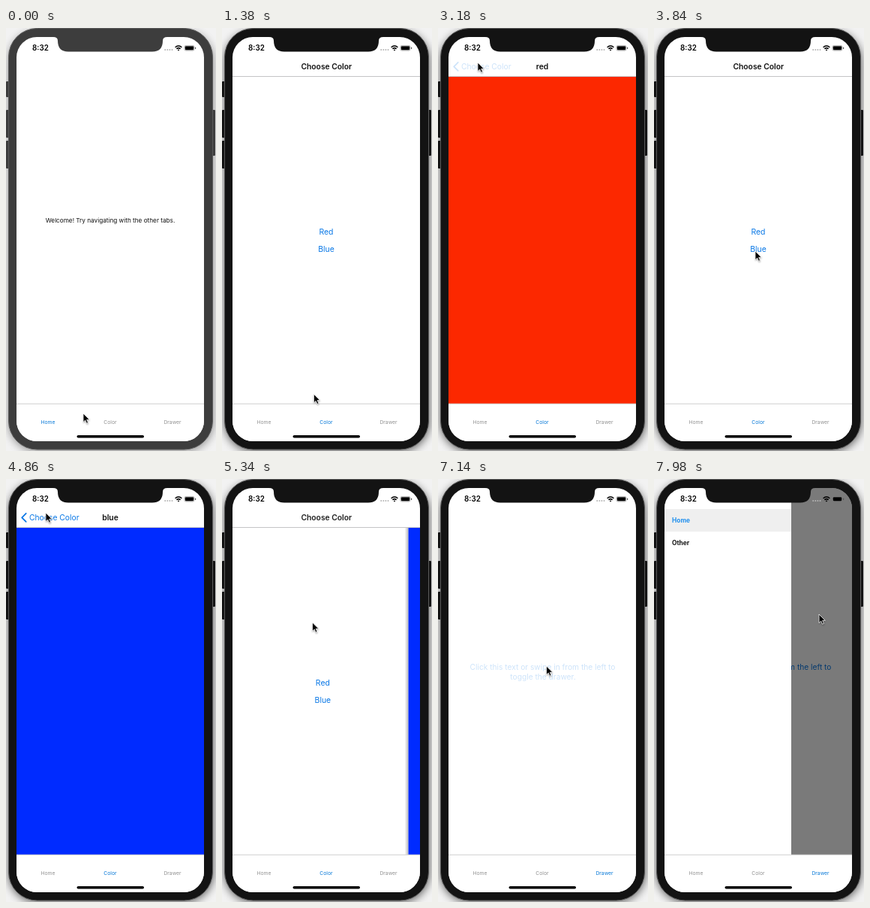
Recreate the animation shown at these times as an HTML page. Size 280 by 563 pixels, loop 8000 ms.

```html
<!DOCTYPE html>
<html lang="en">
<head>
<meta charset="utf-8">
<title>Tab, stack and drawer navigation</title>
<style>
  html, body { margin: 0; width: 100%; height: 100%; overflow: hidden; background: #f2f2f2; }
  svg { display: block; width: 280px; height: 563px; font-family: Inter, Roboto, sans-serif; }
  .mid { text-anchor: middle; }
  .title { font-size: 10.3px; font-weight: 600; fill: #111; }
  .back { font-size: 10.3px; }
  .link { font-size: 10.4px; fill: #0a78e6; }
  .tab { font-size: 6.8px; fill: #929292; text-anchor: middle; }
  .tab.on { fill: #0a7ad8; }
  .item { font-size: 8.4px; font-weight: 700; fill: #151515; }
</style>
</head>
<body>
<svg viewBox="0 0 280 563">
  <defs>
    <clipPath id="glass"><rect x="14" y="12" width="250" height="538" rx="27"/></clipPath>
    <clipPath id="view"><rect x="14" y="12" width="250" height="488"/></clipPath>
    <clipPath id="body"><rect x="14" y="65" width="250" height="435"/></clipPath>
    <linearGradient id="edge">
      <stop offset="0" stop-color="#000" stop-opacity="0"/>
      <stop offset="1" stop-color="#000" stop-opacity=".28"/>
    </linearGradient>
    <filter id="blur" x="-20%" y="-20%" width="140%" height="140%"><feGaussianBlur stdDeviation="6"/></filter>
    <filter id="soft" x="-60%" y="-60%" width="220%" height="220%"><feGaussianBlur stdDeviation=".9"/></filter>
  </defs>

  <rect width="280" height="563" fill="#f2f2f2"/>
  <rect id="shade" x="3" y="4" width="274" height="560" rx="40" filter="url(#blur)"/>
  <g id="bezel">
    <rect x="0" y="71" width="4" height="21" rx="1"/>
    <rect x="0" y="109" width="4" height="37" rx="1"/>
    <rect x="0" y="150" width="4" height="37" rx="1"/>
    <rect x="275" y="109" width="4" height="61" rx="1"/>
    <rect x="3.5" y=".5" width="272" height="560.5" rx="38" stroke="#5a5a5a"/>
  </g>

  <g clip-path="url(#glass)">
    <rect x="14" y="12" width="250" height="538" fill="#fff"/>

    <g id="homeTab">
      <text class="mid" x="139" y="259" font-size="8.2" fill="#111">Welcome! Try navigating with the other tabs.</text>
    </g>

    <g id="colorTab">
      <g clip-path="url(#body)">
        <g id="list">
          <text id="red" class="link mid" x="139" y="275">Red</text>
          <text id="blue" class="link mid" x="139" y="297.5">Blue</text>
        </g>
        <g id="card">
          <rect x="9" y="65" width="5" height="435" fill="url(#edge)"/>
          <rect id="fill" x="14" y="65" width="250" height="435"/>
        </g>
      </g>
      <rect x="14" y="64" width="250" height="1" fill="#c4c4c6"/>
      <text id="listTitle" class="title mid" x="139.3" y="54.7">Choose Color</text>
      <text id="cardTitle" class="title mid" x="139" y="54.7"></text>
      <g id="back">
        <path d="M26.7 45.8 L21.2 51.3 L26.7 56.8" fill="none" stroke="#0a78e6" stroke-width="1.8" stroke-linecap="round" stroke-linejoin="round"/>
        <text class="back" x="31" y="54.7" fill="#0a78e6">Choose Color</text>
      </g>
    </g>

    <g id="drawerTab" clip-path="url(#view)">
      <g id="hint" class="mid" font-size="10.2" fill="#0a78e6">
        <text x="139.5" y="253.7">Click this text or swipe in from the left to</text>
        <text x="140" y="266.5">toggle the drawer.</text>
      </g>
      <rect id="dim" x="14" y="12" width="250" height="488" fill="#000"/>
      <g id="drawer">
        <rect x="14" y="12" width="169" height="488" fill="#fff"/>
        <rect x="14" y="40" width="169" height="30" fill="#efefef"/>
        <text class="item" x="24" y="58.2" style="fill:#2190ee">Home</text>
        <text class="item" x="24" y="88">Other</text>
      </g>
    </g>

    <rect x="14" y="500" width="250" height="50" fill="#fff"/>
    <rect x="14" y="499.7" width="250" height="1" fill="#cfcfcf"/>
    <text class="tab" x="56" y="526.5">Home</text>
    <text class="tab" x="139" y="526.5">Color</text>
    <text class="tab" x="222" y="526.5">Drawer</text>
    <rect x="94.5" y="542" width="89.5" height="3.6" rx="1.8" fill="#000"/>

    <text x="35" y="30.3" font-size="9.8" font-weight="600" fill="#000">8:32</text>
    <g fill="#b5b5b5">
      <circle cx="212.2" cy="29" r="1"/><circle cx="215.3" cy="29" r="1"/>
      <circle cx="218.4" cy="29" r="1"/><circle cx="221.5" cy="29" r="1"/>
    </g>
    <g fill="none" stroke="#000" stroke-width="1.5">
      <path d="M225.6 25.8 Q230 21.8 234.4 25.8"/>
      <path d="M227.4 27.8 Q230 25.4 232.6 27.8"/>
    </g>
    <path d="M228.6 29.1 Q230 28 231.4 29.1 L230 30.6 Z"/>
    <rect x="238" y="23.4" width="13" height="6.6" rx="1.8" fill="none" stroke="#777" stroke-width=".6"/>
    <rect x="238.8" y="24.2" width="11.4" height="5" rx="1.1"/>
    <rect x="252" y="25.5" width="1.2" height="2.4" rx=".6" fill="#555"/>
  </g>

  <path id="notch" d="M63 11 H215 V12 Q209 12 209 17 Q209 31.5 195 31.5 H83 Q69 31.5 69 17 Q69 12 63 12 Z"/>

  <g id="cursor">
    <path d="M0 1 V13 L3 10.4 L5 15 L7 14 L5 9.6 H9 Z" opacity=".4" filter="url(#soft)"/>
    <path d="M0 0 V11.6 L2.7 9.1 L4.5 13.2 L6.5 12.3 L4.7 8.3 H8.3 Z" fill="#000" stroke="#fff" stroke-width=".8"/>
  </g>
</svg>
<script>
const LOOP = 8000, STEP = 60;
const $ = id => document.getElementById(id);
const tabs = [...document.querySelectorAll('.tab')];
const screens = ['homeTab', 'colorTab', 'drawerTab'].map($);
const clamp = v => Math.max(0, Math.min(1, v));
const mix = (a, b, k) => a + (b - a) * k;
const ramp = (t, start, span) => clamp((t - start) / span);
const smooth = k => k * k * (3 - 2 * k);

function bezier(x1, y1, x2, y2) {
  const at = (a, b, s) => 3 * (1 - s) ** 2 * s * a + 3 * (1 - s) * s * s * b + s ** 3;
  return x => {
    let lo = 0, hi = 1;
    for (let i = 0; i < 24; i++) {
      const s = (lo + hi) / 2;
      if (at(x1, x2, s) < x) lo = s; else hi = s;
    }
    return x >= 1 ? 1 : at(y1, y2, lo);
  };
}
const slide = bezier(.2833, .99, .31833, .99);

// time, x, y
const pointer = [
  [60, 103, 513], [720, 119, 521], [1260, 119, 521], [1800, 146, 254],
  [2040, 139, 270], [2580, 139, 270], [2880, 62, 58], [3000, 50, 27],
  [3120, 52, 45], [3240, 54, 47], [3720, 134, 286], [3840, 135, 297],
  [4440, 135, 297], [4800, 53, 45], [4920, 53, 45], [4980, 54, 31],
  [5100, 57, 47], [5340, 120.5, 191], [5640, 133, 294], [5940, 224, 519],
  [6120, 224, 519], [6240, 223, 521], [6480, 223, 520], [6960, 144.5, 249],
  [7380, 144.5, 249], [7920, 220, 180]
];

function pointerAt(t) {
  const i = pointer.findIndex(p => p[0] > t);
  if (i === 0) return pointer[0].slice(1);
  if (i < 0) return pointer[pointer.length - 1].slice(1);
  const [a, b] = [pointer[i - 1], pointer[i]];
  const k = smooth((t - a[0]) / (b[0] - a[0]));
  return [mix(a[1], b[1], k), mix(a[2], b[2], k)];
}

// Opacity of a touchable: fades down on press, back up on release.
const press = (t, down, up) => 1 - .8 * smooth(ramp(t, down, 130)) * (1 - smooth(ramp(t, up, 230)));

const visits = [
  { name: 'red', color: '#fc2800', push: 2192, pop: 3190 },
  { name: 'blue', color: '#002bff', push: 4112, pop: 5113 }
];

function draw(t) {
  const active = t >= 480;
  $('bezel').setAttribute('fill', active ? '#131313' : '#3d3d3d');
  $('notch').setAttribute('fill', active ? '#131313' : '#3d3d3d');
  $('shade').setAttribute('opacity', active ? .6 : .4);

  const tab = t < 540 ? 0 : t < 6180 ? 1 : 2;
  tabs.forEach((el, i) => el.classList.toggle('on', i === tab));
  screens.forEach((el, i) => el.style.display = i === tab ? '' : 'none');

  const v = visits[t < 4000 ? 0 : 1];
  const p = slide(ramp(t, v.push, 500)) - slide(ramp(t, v.pop, 500));
  const shown = clamp((p - .6) / .4);
  $('list').setAttribute('transform', `translate(${-75 * p} 0)`);
  $('card').setAttribute('transform', `translate(${250 * (1 - p)} 0)`);
  $('card').style.display = p > 0 ? '' : 'none';
  $('fill').setAttribute('fill', v.color);
  $('cardTitle').textContent = v.name;
  $('cardTitle').setAttribute('opacity', shown);
  $('listTitle').setAttribute('opacity', 1 - p);
  $('back').setAttribute('opacity', shown * press(t, v.pop - 150, v.pop));
  visits.forEach(w => $(w.name).setAttribute('opacity', press(t, w.push - 130, w.push)));

  const open = 1 - (1 - ramp(t, 7200, 620)) ** 3;
  $('hint').setAttribute('opacity', press(t, 7000, 7190));
  $('dim').setAttribute('opacity', .52 * open);
  $('drawer').setAttribute('transform', `translate(${-169 * (1 - open)} 0)`);

  $('cursor').setAttribute('transform', `translate(${pointerAt(t)})`);
}

const start = performance.now();
function tick() {
  const t = (performance.now() - start) % LOOP;
  draw(Math.floor(t / STEP) * STEP);
  requestAnimationFrame(tick);
}
tick();
</script>
</body>
</html>
```
